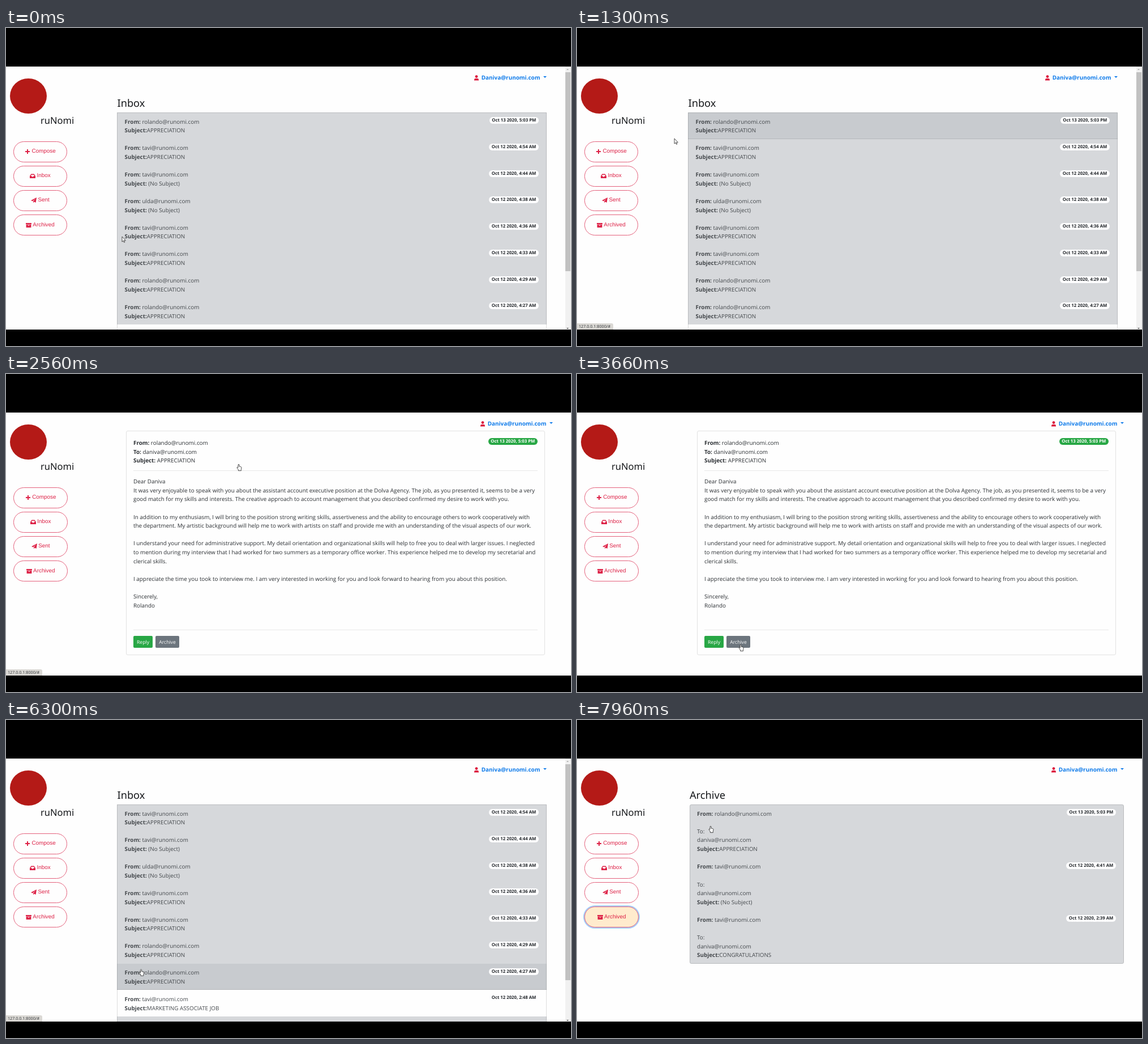
An HTML page that plays this animation: 998x561 px, repeating every 8000 ms.

```html
<!DOCTYPE html>
<html lang="en">
<head>
<meta charset="utf-8">
<title>Mailbox</title>
<style>
html, body { margin: 0; width: 100%; height: 100%; overflow: hidden; background: #fefefe; }
body { position: relative; font: 9.87px/15.6px "Open Sans", sans-serif; color: #2b2f33; text-rendering: geometricPrecision; }
body > *, .view > * { position: absolute; }
.view { inset: 0; }
b { font-weight: 700; }
.bar { left: 0; width: 998px; background: #000; }
.logo { left: 7px; top: 89px; width: 65px; height: 62px; border-radius: 50%; background: #b41a17; }
.title { font: 18.2px/22px "Noto Sans", sans-serif; color: #16181b; white-space: pre; }
.icon { width: 10px; height: 10px; fill: currentColor; fill-rule: evenodd; }
.nav { left: 12.8px; height: 36.8px; box-sizing: border-box; border: 1px solid #e4617c; border-radius: 19px;
  display: flex; align-items: center; justify-content: center; gap: 2.5px;
  font: 9.9px/12px "Liberation Sans", Arial, sans-serif; color: #dd2146; }
.nav.hot { background: #ffebcd; }
.nav.focus { box-shadow: 0 0 0 2px rgba(0, 123, 255, .35); }
.user { top: 79.5px; display: flex; align-items: center; gap: 3.5px; font-size: 9.95px; font-weight: 700; color: #0f7bea; }
.user .icon { color: #dc143c; position: relative; top: 1px; }
.caret { margin-left: 2px; border: 3.5px solid transparent; border-top-color: #0f7bea; border-bottom: 0; position: relative; top: -1px; }
.list { top: 149px; box-sizing: border-box; }
.list::after { content: ""; position: absolute; inset: 0; border: 1px solid rgba(0, 0, 0, .13); border-radius: inherit; }
.row { position: relative; height: 46.75px; box-sizing: border-box; padding: 8.7px 0 0 13.6px; background: #d6d8db;
  color: #44484c; white-space: pre; }
.row.plain { background: #fefefe; }
.row.hot { background: #c8cbcf; box-shadow: inset 0 -1px #b4b7bb; }
.row.tall { height: 93.7px; }
.badge { position: absolute; top: 8px; right: 14px; height: 12px; padding: 0 4.7px; border-radius: 6px;
  background: #fdfdfe; color: #212529; font: 700 7.75px/12px "Open Sans", sans-serif; white-space: pre; }
.badge.green { top: 113px; right: 59px; background: #28a745; color: #fff; }
.card { left: 211.5px; top: 100px; width: 740.5px; height: 396px; box-sizing: border-box; border: 1px solid #e2e2e2; border-radius: 3px; }
.text { left: 225px; white-space: pre; }
.rule { left: 225px; width: 714px; height: 1px; background: #e8e8e8; }
.btn { top: 462px; height: 21px; border-radius: 2px; color: #fff; text-align: center; font-size: 8.65px; line-height: 22px; }
.btn.press { background: #545b62 !important; box-shadow: 0 0 0 2px rgba(130, 138, 145, .5); }
#scroll { left: 987.5px; top: 68px; width: 10.5px; height: 464px; background: #f1f1f1; }
#scroll * { position: absolute; }
#thumb { left: .8px; top: 10px; width: 9px; background: #c1c1c1; }
.tick { left: 2.6px; border: 2.6px solid transparent; }
#status { left: 0; top: 521px; width: 64px; height: 11px; background: #dad8d4; border-radius: 0 3px 0 0;
  font-size: 7.2px; line-height: 13px; text-indent: 3px; color: #34373a; }
#cursor { left: 0; top: 0; overflow: visible; }
#cursor path { fill: #fff; stroke: #222; stroke-width: .8; stroke-linejoin: round; }
</style>
</head>
<body>
<div class="logo"></div>
<div class="title" style="left:61px;top:151.6px;font-size:16.5px">ruNomi</div>
<div id="navs"></div>
<div class="user" id="user"></div>

<div class="view" id="inbox">
  <div class="title" style="left:196.5px;top:122px">Inbox</div>
  <div class="list" id="mails" style="left:196px;width:759px"></div>
</div>

<div class="view" id="message">
  <div class="card"></div>
  <div class="text" style="top:114.2px"><b>From:</b> rolando@runomi.com
<b>To:</b> daniva@runomi.com
<b>Subject:</b> APPRECIATION</div>
  <div class="badge green">Oct 13 2020, 5:03 PM</div>
  <div class="rule" style="top:170px"></div>
  <div class="text" style="top:182.3px">Dear Daniva
It was very enjoyable to speak with you about the assistant account executive position at the Dolva Agency. The job, as you presented it, seems to be a very
good match for my skills and interests. The creative approach to account management that you described confirmed my desire to work with you.

In addition to my enthusiasm, I will bring to the position strong writing skills, assertiveness and the ability to encourage others to work cooperatively with
the department. My artistic background will help me to work with artists on staff and provide me with an understanding of the visual aspects of our work.

I understand your need for administrative support. My detail orientation and organizational skills will help to free you to deal with larger issues. I neglected
to mention during my interview that I had worked for two summers as a temporary office worker. This experience helped me to develop my secretarial and
clerical skills.

I appreciate the time you took to interview me. I am very interested in working for you and look forward to hearing from you about this position.

Sincerely,
Rolando</div>
  <div class="rule" style="top:451px"></div>
  <div class="btn" style="left:225px;width:34px;background:#28a745">Reply</div>
  <div class="btn" id="archiveBtn" style="left:264px;width:42px;background:#6c757d">Archive</div>
</div>

<div class="view" id="archive">
  <div class="title" style="left:199px;top:122px">Archive</div>
  <div class="list" id="stored" style="left:198.5px;width:767.5px;border-radius:3px;overflow:hidden"></div>
</div>

<div id="scroll">
  <i class="tick" style="top:2px;border-bottom-color:#a5a5a5;border-top:0;margin-top:2px"></i>
  <i id="thumb"></i>
  <i class="tick" style="bottom:1px;border-top-color:#505050;border-bottom:0"></i>
</div>
<div id="status">127.0.0.1:8000/#</div>
<svg id="cursor" width="1" height="1">
  <path id="arrow" d="M0 0V9.2L2.1 7.3 3.5 10.3 4.9 9.7 3.5 6.8H6.3Z"/>
  <path id="hand" d="M-1 1Q0-.6 1 1V4L3.6 4.6Q5 4.9 5 6.2L4.3 9.4V11.6H-.6V9.8L-3 6.4Q-3.2 4.9-1.7 5.5L-1 6.2Z"/>
</svg>
<div class="bar" style="top:0;height:68px"></div>
<div class="bar" style="top:532px;height:29px"></div>

<script>
const $ = id => document.getElementById(id);
const LOOP = 8000, OPEN = 2560, PRESS = 5130, BACK = 5600, FOCUS = 7260, STORE = 7400;
const TOP = 149, ROW = 46.75, LAG = 60;

const icons = {
  Compose: "M4 1h2v3h3v2H6v3H4V6H1V4h3z",
  Inbox: "M2.3 1.5h5.4L10 5.2V9H0V5.2zM3 3 1.7 5.3h1.8l.6 1.2h1.8l.6-1.2h1.8L7 3z",
  Sent: "M10 0 8.6 9 5.3 7.6 4 9.8V7L8 2 3 6.4 0 5.2z",
  Archived: "M0 1h10v2.2H0zM.6 3.8h8.8V9H.6zM3.6 4.8v.9h2.8v-.9z",
  user: "M5 5a2.4 2.4 0 1 0-.01 0M1 9.5V8.4Q1 6 3.4 6h3.2Q9 6 9 8.4v1.1z"
};
const icon = name => `<svg class="icon" viewBox="0 0 10 10"><path d="${icons[name]}"/></svg>`;

$("navs").outerHTML = ["Compose", "Inbox", "Sent", "Archived"].map((name, i) =>
  `<div class="nav" style="top:${199.8 + i * 43.15}px">${icon(name)}${name}</div>`).join("");
$("user").innerHTML = icon("user") + '<span>Daniva@runomi.com</span><i class="caret"></i>';
const navs = [...document.querySelectorAll(".nav")], archived = navs[3];

const AP = "APPRECIATION", NONE = " (No Subject)";
const badge = (day, time) => `<span class="badge">Oct ${day} 2020, ${time}</span>`;
const row = ([from, subject, time, day = 12, kind = ""], to = "") =>
  `<div class="row ${kind}"><b>From:</b> ${from}@runomi.com\n${to}<b>Subject:</b>${subject}${badge(day, time)}</div>`;

$("mails").innerHTML = [
  ["rolando", AP, "5:03 PM", 13], ["tavi", AP, "4:54 AM"], ["tavi", NONE, "4:44 AM"],
  ["ulda", NONE, "4:38 AM"], ["tavi", AP, "4:36 AM"], ["tavi", AP, "4:33 AM"],
  ["rolando", AP, "4:29 AM"], ["rolando", AP, "4:27 AM"],
  ["tavi", "MARKETING ASSOCIATE JOB", "2:48 AM", 12, "plain"]
].map(m => row(m)).join("") + '<div class="row"></div>';

$("stored").innerHTML = [
  ["rolando", AP, "5:03 PM", 13, "tall"], ["tavi", NONE, "4:41 AM", 12, "tall"],
  ["tavi", "CONGRATULATIONS", "2:39 AM", 12, "tall"]
].map(m => row(m, "\nTo:\ndaniva@runomi.com\n")).join("");
const rows = [...$("mails").children];

// Pointer path: time, x, y
const path = [
  [0, 205, 368], [200, 205, 368], [600, 238, 262], [1000, 225, 178], [1240, 198, 186],
  [1300, 172, 195], [1420, 173, 193], [1830, 396, 161], [1900, 411, 159], [2830, 411, 159],
  [3630, 289, 477], [3660, 289, 477], [3800, 312, 494], [4000, 345, 450], [4200, 325, 407],
  [4460, 273, 458], [4500, 273, 458], [4730, 292, 470], [5500, 292, 470], [5700, 239, 440],
  [6300, 239, 440], [6560, 126, 342], [6700, 126, 342], [6960, 89, 343], [7860, 89, 343],
  [7960, 236, 187], [LOOP, 236, 187]
];
function pointer(t) {
  const i = Math.max(1, path.findIndex(p => p[0] >= t));
  const [t0, x0, y0] = path[i - 1], [t1, x1, y1] = path[i];
  const k = Math.max(0, (t - t0) / (t1 - t0));
  return [x0 + (x1 - x0) * k, y0 + (y1 - y0) * k];
}
const inside = ([x, y], l, t, r, b) => x >= l && x <= r && y >= t && y <= b;
const onNav = p => inside(p, 13, 330, 108, 366);
const show = (el, on) => el.style.display = on ? "" : "none";

function draw(now) {
  const t = now % LOOP;
  const view = t < OPEN ? "inbox" : t < BACK ? "message" : t < STORE ? "inbox" : "archive";
  const listed = view === "inbox", shift = listed ? 0 : 11;
  for (const id of ["inbox", "message", "archive"]) show($(id), id === view);

  show($("scroll"), listed);
  $("thumb").style.height = (t < OPEN ? 351 : 381) + "px";
  $("user").style.right = 43 - shift + "px";
  navs.forEach(n => n.style.width = (listed ? 95 : 96.5) + "px");

  const first = t < OPEN ? 0 : 1;
  show(rows[0], !first);
  const at = pointer(t), late = pointer(Math.max(0, t - LAG));
  const live = t > 230 && listed;
  const hot = live && late[0] >= 196 ? Math.floor((late[1] - TOP) / ROW) + first : -1;
  rows.forEach((r, i) => r.classList.toggle("hot", i === hot));

  archived.classList.toggle("hot", onNav(late) || t >= FOCUS);
  archived.classList.toggle("focus", t >= FOCUS);
  $("archiveBtn").classList.toggle("press", t >= PRESS);
  show($("status"), (t > 230 && t < 2920) || (t >= BACK && t < 6800));

  const hand = onNav(at) ||
    (view === "message" ? t < 2860 || inside(at, 225, 458, 306, 483)
      : t > 230 && inside(at, 196, TOP, 955, 532));
  show($("hand"), hand);
  show($("arrow"), !hand);
  $("cursor").style.transform = `translate(${at[0]}px, ${at[1]}px)`;
  requestAnimationFrame(draw);
}
draw(0);
</script>
</body>
</html>
```
